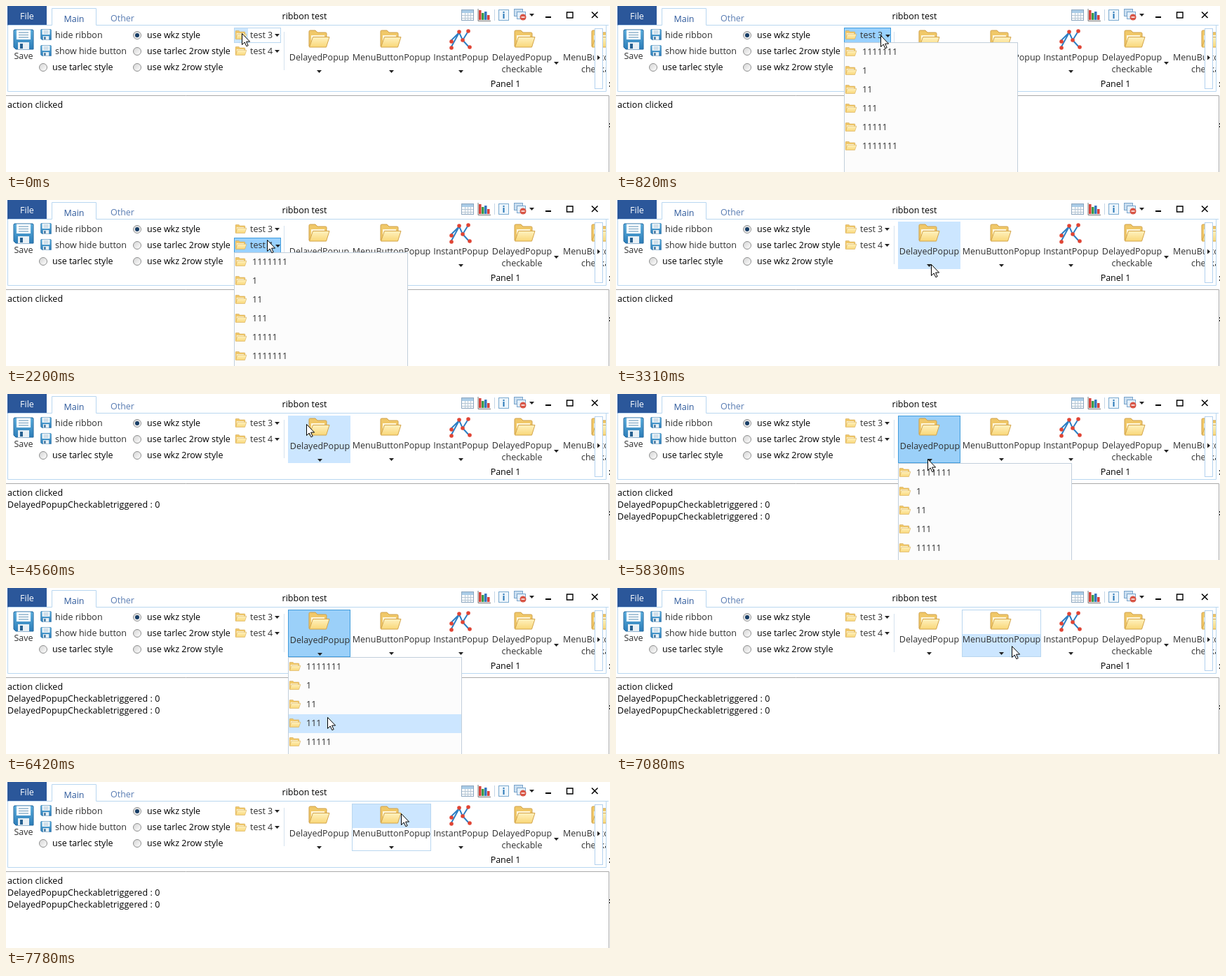
Write an HTML page that moves like this. It is 861 by 238 pixels and loops after 8000 ms.

```html
<!DOCTYPE html>
<html lang="en">
<head>
<meta charset="utf-8">
<title>ribbon test</title>
<style>
html, body { margin: 0; width: 100%; height: 100%; overflow: hidden; background: #fff; }
svg { display: block; font: 12.5px "Open Sans", "Noto Sans", sans-serif; }
</style>
</head>
<body>
<svg width="861" height="238" viewBox="0 0 861 238">
  <defs>
    <linearGradient id="gold" x2="0" y2="1"><stop stop-color="#fff2c0"/><stop offset="1" stop-color="#f9d778"/></linearGradient>
    <linearGradient id="blue" x2="0" y2="1"><stop stop-color="#5fb0de"/><stop offset="1" stop-color="#2c7db8"/></linearGradient>
    <linearGradient id="grey" x2="1" y2="1"><stop stop-color="#d4d4d4"/><stop offset="1" stop-color="#fff"/></linearGradient>
    <clipPath id="page"><path d="M3 28H855V122H3Z"/></clipPath>
    <symbol id="folder" viewBox="0 0 31 26" preserveAspectRatio="none">
      <path d="M1 24V2.5Q1 1 2.5 1H10L13 4H24.5Q26 4 26 5.5V12" fill="#f0c869" stroke="#cfa048"/>
      <path d="M4 8H23V20H4Z" fill="#fff8df"/>
      <path d="M6.5 10.5H30L25.5 25H1.5Z" fill="url(#gold)" stroke="#d3a44a"/>
    </symbol>
    <symbol id="disk" viewBox="0 0 30 30">
      <path d="M2 1H28L29 2V29H4L1 26V2Z" fill="url(#blue)" stroke="#25699f"/>
      <path d="M5 1.5H25V15H5Z" fill="#fff"/>
      <path d="M8 5H22M8 8.5H22M8 12H22" stroke="#8fb3cc" stroke-width="1.4"/>
      <path d="M7 19H23V29H7Z" fill="#e9f0f5"/>
      <path d="M10 21H14V28H10Z" fill="#27608f"/>
    </symbol>
  </defs>
  <g id="scene"></g>
</svg>
<script>
const LOOP = 8000, HOVER = '#cce6ff', DOWN = '#99d1ff', DOWN_EDGE = '#429ddd', EDGE = '#b9d7f0', INK = '#2f2f2f';
const scene = document.getElementById('scene');

// time, pointer x, pointer y, highlighted part
const steps = [
  [0, 336, 39, 'icon3'], [300, 351, 40, 'text3'], [420, 368, 41, 'text3'], [540, 378, 43, 'down3'],
  [820, 377, 42, 'down3'], [1370, 376, 44, 'text3'], [1680, 373, 56, 'text4'], [2200, 372, 57, 'down4'],
  [2760, 376, 61, 'text4'], [2880, 449, 77, 'delay'], [3040, 468, 84, 'delay'], [3190, 458, 89, 'delay'],
  [3310, 449, 92, 'delay'], [4170, 438, 66, 'delay'], [4290, 428, 43, 'delay'], [4960, 444, 93, 'delay'],
  [5830, 444, 93, 'delayDown'], [6290, 452, 140, 'delayDown'], [6420, 458, 185, 'delayDown'],
  [6820, 451, 172, ''], [6960, 512, 122, ''], [7080, 564, 83, 'menuLow'], [7230, 572, 79, 'menuLow'],
  [7630, 572, 78, 'menuLow'], [7780, 563, 45, 'menuTop']
];

const text = (x, y, s, fill = INK, anchor = 'start') =>
  `<text x="${x}" y="${y}" fill="${fill}" text-anchor="${anchor}">${s}</text>`;
const rect = (x, y, w, h, fill, stroke = 'none') =>
  `<rect x="${x}" y="${y}" width="${w}" height="${h}" fill="${fill}" stroke="${stroke}"/>`;
const path = (d, stroke, fill = 'none', width = 1) =>
  `<path d="${d}" fill="${fill}" stroke="${stroke}" stroke-width="${width}"/>`;
const circle = (x, y, r, fill, stroke = 'none') =>
  `<circle cx="${x}" cy="${y}" r="${r}" fill="${fill}" stroke="${stroke}"/>`;
const icon = (id, x, y, w, h) => `<use href="#${id}" x="${x}" y="${y}" width="${w}" height="${h}"/>`;
const arrow = (x, y) => path(`M${x - 3.5} ${y}h7l-3.5 4z`, 'none', '#222');
const radio = (x, y, label, on) => circle(x, y, 5.5, 'url(#grey)', '#8e8f8f') +
  (on ? circle(x, y, 3, '#173d66') : '') + text(x + 14 - (x < 99), y + 4, label, '#000');

function titleBar() {
  let bars = '';
  [['#d8433b', 14], ['#3a9b4b', 10], ['#3476c0', 12], ['#d8433b', 7]].forEach(([c, h], i) =>
    bars += rect(674 + i * 4, 20 - h, 3.5, h, c));
  return rect(2, 0, 56, 28, '#2b579a') + text(30, 19, 'File', '#fff', 'middle') +
    path('M2.5 27.5H65.5V3.5H128.5V27.5H859', EDGE) +
    text(97, 22.5, 'Main', '#2b579a', 'middle') + text(149, 22, 'Other', '#5a7db3') +
    text(425.5, 19, 'ribbon test', '#000', 'middle') +
    rect(649.5, 5.5, 17, 15, '#fff', '#8ba6bf') + rect(650, 6, 16, 4, '#a9cbe6') +
    path('M650 13.5H666M650 17.5H666M654.5 10V20M658.5 10V20M662.5 10V20', '#b5c6d4') +
    path('M673 4V21.5H691', '#777') + bars +
    path('M696.5 5V21', '#c3d5e6') +
    rect(702.5, 5.5, 14, 15, '#eef6fc', '#79a9cf') + rect(708.5, 8, 2, 2, '#2878b8') + rect(708.5, 11, 2, 7, '#2878b8') +
    rect(724.5, 4.5, 12, 10, '#c9def0', '#7ba5cb') + rect(728.5, 8.5, 12, 10, '#e4f0fa', '#7ba5cb') +
    circle(737, 16, 4.5, '#d95545') + path('M734.5 16H739.5', '#fff', 'none', 1.5) +
    arrow(749.5, 11) +
    path('M769 16H777', '#000', 'none', 2) + path('M799.5 9H808V17H799.5Z', '#000', 'none', 1.4) +
    path('M835 8.5L843.5 17M843.5 8.5L835 17', '#000', 'none', 1.5);
}

function frame() {
  return path('M2.5 28V122.5H855.5V28', EDGE) + path('M0 128.5H859.5V238', '#a9a9a9') +
    path('M860.5 109v2M860.5 114v2M860.5 168v2M860.5 172v2', '#222');
}

function leftPanel() {
  return icon('disk', 10, 33, 30, 30) + text(25, 76, 'Save', INK, 'middle') +
    icon('disk', 49, 33, 16, 16) + text(70, 46, 'hide ribbon') +
    icon('disk', 49, 56, 16, 16) + text(70, 69, 'show hide button') +
    radio(53, 88, 'use tarlec style') + radio(187, 42, 'use wkz style', true) +
    radio(187, 65, 'use tarlec 2row style') + radio(187, 88, 'use wkz 2row style') +
    path('M396.5 37V92', '#d5e2ee');
}

function smallButton(n, part, nudge) {
  const y = n === 3 ? 31 : 54;
  let box = '';
  if (part === 'down' + n) box = rect(325.5, y + .5, 66, 21, DOWN, DOWN_EDGE);
  else if (part === 'icon' + n) box = rect(325.5, y + .5, 66, 21, '#fff', EDGE) + rect(326, y + 1, 19, 20, HOVER);
  else if (part === 'text' + n) box = rect(325.5, y + .5, 66, 21, '#fff', EDGE) + rect(345, y + 1, 46, 20, HOVER);
  return box + icon('folder', 326.5, y + 4, 17, 13) + text(348, y + 15, 'test ' + n) +
    arrow(386.5 + nudge, y + 9 + nudge);
}

function bigButtons(part, nudge) {
  let s = '';
  if (part === 'delay') s += rect(402, 31, 89, 68, HOVER);
  if (part === 'delayDown') s += rect(402.5, 31.5, 88, 67, '#9bd0f9', DOWN_EDGE);
  if (part.startsWith('menu')) s += rect(493.5, 31.5, 112, 67, '#fff', EDGE) +
    (part === 'menuTop' ? rect(494, 32, 111, 34, HOVER) : rect(494, 66, 111, 32, HOVER));
  for (const x of [431, 533, 724, 834]) s += icon('folder', x, 34, 31, 26);
  s += path('M634 60L646 38L651 49L659 36M634 50L646 38M651 49L661 60', '#2d7fc4', 'none', 2);
  for (const [x, y] of [[635, 51], [635, 60], [646, 37], [651, 49], [659, 36], [661, 59]]) s += circle(x, y, 2.8, '#e04434');
  return s + text(446.5 + nudge, 78 + nudge, 'DelayedPopup', INK, 'middle') + arrow(446.5 + nudge, 92 + nudge) +
    text(549.5, 78, 'MenuButtonPopup', INK, 'middle') + arrow(549.5, 92) +
    text(648.5, 78, 'InstantPopup', INK, 'middle') + arrow(648.5, 92) +
    text(735.5, 78, 'DelayedPopup', INK, 'middle') + text(735.5, 95, 'checkable', INK, 'middle') + arrow(784.5, 80) +
    text(794, 78, 'MenuButtonPopup') + text(820, 95, 'checkable') +
    text(712, 116, 'Panel 1', '#000', 'middle') +
    rect(839.5, 32.5, 11, 86, '#fff', '#b3d1ef') + path('M843 70.5V77.5L847 74Z', 'none', '#222');
}

function popup(x, y, active = -1) {
  let s = rect(x + .5, y + .5, 247, 200, '#fcfcfc', '#c2cfdb');
  [7, 1, 2, 3, 5, 7].forEach((len, i) => {
    const mid = y + 14 + i * 27;
    if (i === active) s += rect(x + 1, mid - 13, 246, 27, HOVER);
    s += icon('folder', x + 1.5, mid - 7, 17, 13) + text(x + 26, mid + 4, '1'.repeat(len));
  });
  return s;
}

function log(t) {
  let s = text(2, 146, 'action clicked', '#000');
  [3920, 4680].forEach((start, i) => {
    if (t >= start) s += text(2, 163 + i * 17, 'DelayedPopupCheckabletriggered : 0', '#000');
  });
  return `<g letter-spacing=".07">${s}</g>`;
}

const pointer = (x, y) => path(`M${x + .5} ${y + .5}v16l3.7-3.5l2.6 5.7l2.4-1l-2.6-5.6h5z`, '#000', '#fff');

function draw(t) {
  const within = (a, b) => t >= a && t < b;
  const [, x, y, part] = steps.findLast(s => s[0] <= t);
  const pushed = within(4560, 4680) || within(5210, 6820);
  let s = titleBar() + frame() + leftPanel() +
    smallButton(3, part, +within(160, 1370)) + smallButton(4, part, +(part === 'down4')) +
    `<g clip-path="url(#page)">${bigButtons(part, +pushed)}</g>` + log(t);
  if (within(820, 1370)) s += popup(325, 52);
  if (within(2200, 2760)) s += popup(325, 75);
  if (within(5830, 6820)) s += popup(402, 99, t >= 6420 ? 3 : t >= 6290 ? 1 : -1);
  return s + pointer(x, y);
}

let shown = '';
function tick() {
  const next = draw(performance.now() % LOOP);
  if (next !== shown) scene.innerHTML = shown = next;
  requestAnimationFrame(tick);
}
tick();
</script>
</body>
</html>
```
